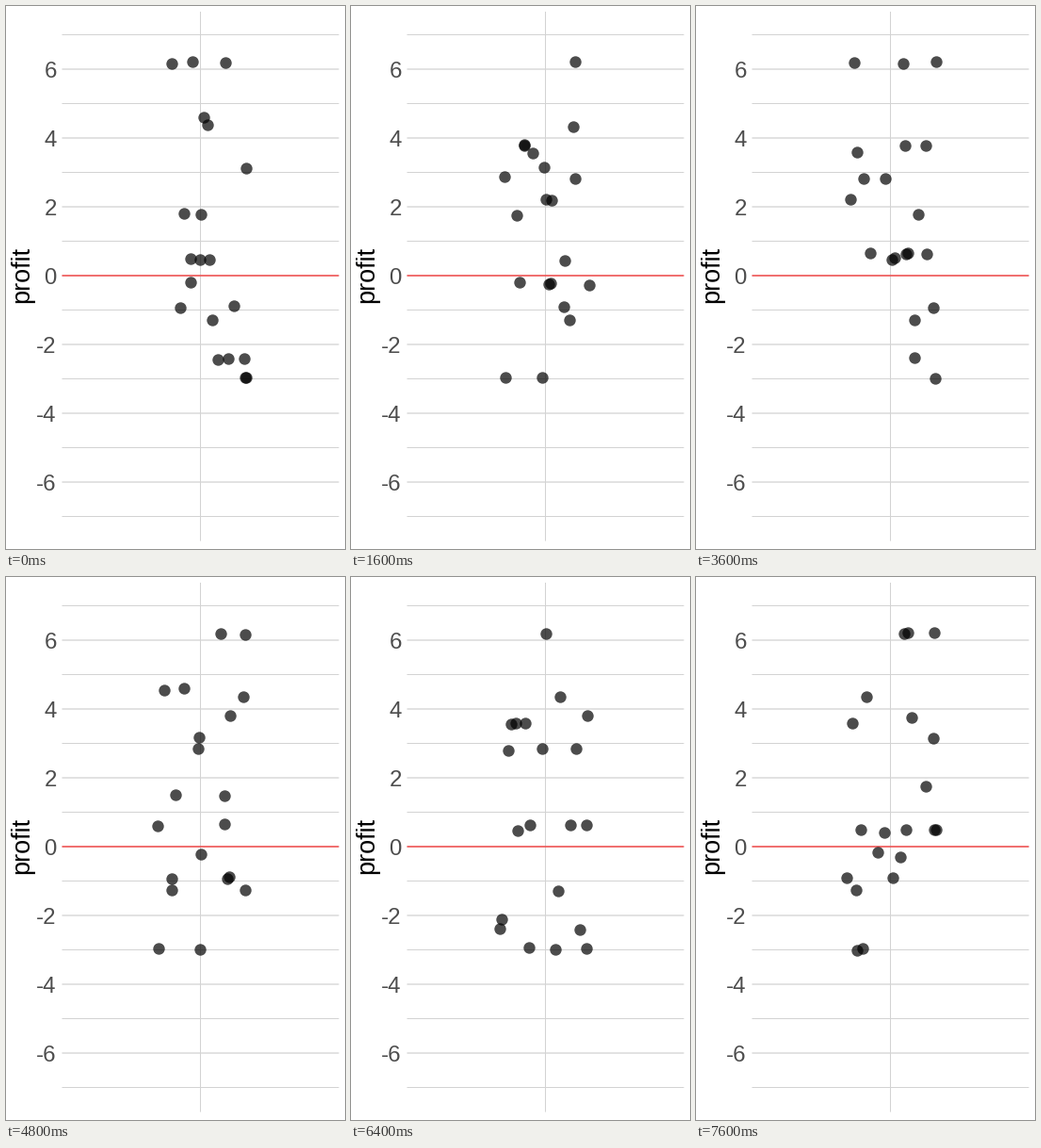
Recreate the animation shown at these times as a matplotlib script. Size 360 by 576 pixels, loop 8 s.

```python
import numpy as np
import matplotlib.pyplot as plt
from matplotlib.animation import FuncAnimation

W, H, DPI = 360, 576, 72
FRAMES, INTERVAL = 20, 400
LEFT, RIGHT, TOP, BOTTOM, MID = 59.5, 353.5, 6, 567.5, 206.5
ZERO, UNIT = 286, 36.5
SPREAD_X, SPREAD_Y = 49, 0.035
GREY = "#d3d3d3"

# The observed profits that every resample draws from
PROFITS = [6.2, 4.57, 4.36, 3.79, 3.57, 3.15, 2.84, 2.22, 1.77, 1.46,
           0.63, 0.49, 0.43, -0.2, -0.27, -0.9, -1.28, -2.15, -2.4, -2.98]

plt.rcParams["font.family"] = "Liberation Sans"
plt.rcParams["axes.unicode_minus"] = False


def to_y(profit):
    return ZERO - UNIT * profit


def resample(index):
    """Bootstrap draw that keeps both extremes, jittered around the middle."""
    rng = np.random.default_rng(100 + index)
    picks = rng.choice(PROFITS, len(PROFITS) - 2)
    profit = np.concatenate([[PROFITS[0], PROFITS[-1]], picks])
    x = MID + rng.uniform(-SPREAD_X, SPREAD_X, profit.size)
    y = to_y(profit + rng.uniform(-SPREAD_Y, SPREAD_Y, profit.size))
    return np.column_stack([x, y])


fig = plt.figure(figsize=(W / DPI, H / DPI), dpi=DPI, facecolor="white")
ax = fig.add_axes([0, 0, 1, 1])
ax.set_xlim(0, W)
ax.set_ylim(H, 0)
ax.axis("off")


def line(xs, ys, color=GREY, width=1):
    ax.plot(xs, ys, color=color, lw=width, zorder=1, snap=False,
            solid_capstyle="butt")


# Grid and axis labels; labelled lines are slightly heavier
line([MID, MID], [TOP, BOTTOM])
for value in range(-7, 8):
    y = to_y(value)
    major = value % 2 == 0
    line([LEFT, RIGHT], [y, y], width=1.3 if major else 1)
    if major:
        ax.text(53.8, y + 8.6, str(value), size=24, color="#4d4d4d",
                ha="right", va="baseline")
line([LEFT, RIGHT], [ZERO, ZERO], color="red")
ax.text(23.8, 285, "profit", size=27, color="black", rotation=90,
        ha="center", va="baseline", rotation_mode="anchor")

dots = ax.scatter([], [], s=12.4 ** 2, color="black", alpha=0.7,
                  linewidths=0, zorder=3)


def update(index):
    dots.set_offsets(resample(index))
    return (dots,)


anim = FuncAnimation(fig, update, frames=FRAMES, interval=INTERVAL,
                     repeat=True, repeat_delay=0)
plt.show()
```
